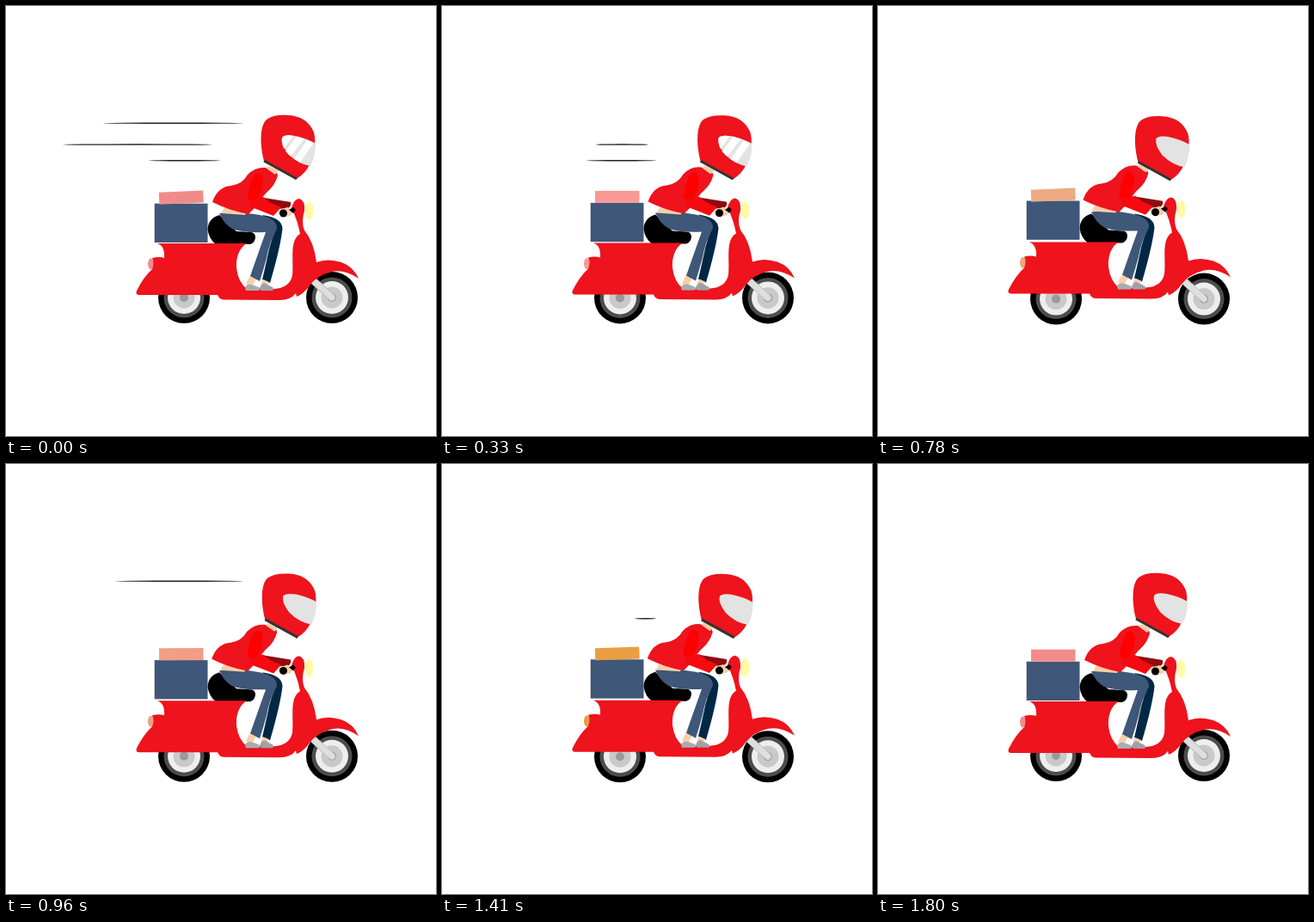
An HTML page for the animation above (1.86 s loop, 500 by 500 pixels).

```html
<!DOCTYPE html>
<html lang="en">
<head>
<meta charset="utf-8">
<title>Scooter delivery</title>
<style>
html, body { margin: 0; width: 100%; height: 100%; overflow: hidden; background: #fff; }
svg { display: block; width: 100%; height: 100%; }
</style>
</head>
<body>
<svg viewBox="0 0 500 500">
  <g id="lines" fill="#222"><ellipse/><ellipse/><ellipse/></g>

  <g id="wheels">
    <g id="wheel">
      <circle cx="207" cy="339" r="30"/>
      <circle cx="207" cy="339" r="23.500" fill="#4d4d4d"/>
      <circle cx="207" cy="339" r="19" fill="#eee"/>
      <circle cx="207" cy="339" r="12.500" fill="#c9c9c9"/>
      <circle cx="207" cy="339" r="5" fill="#999"/>
    </g>
    <use href="#wheel" x="172"/>
    <path d="M357 319L379 339" stroke="#bbb" stroke-width="8.500" stroke-linecap="round"/>
    <path d="M357 319L379 339" stroke="#dedede" stroke-width="7" stroke-linecap="round"/>
  </g>

  <g id="body">
    <path d="M248 243Q235 247 234.500 260Q236 271 244 277H284Q290 275 290 268Q289 263 284 263L268 262Q258 252 248 243Z"/>
    <ellipse id="tail" cx="168.500" cy="300" rx="3.500" ry="6.500"/>
    <path fill="#ee131c" d="M176 276H280C271 281 267 293 268 305Q270 321 280 329H311Q330 328 333 313C335 297 329 272 342 265Q339 249 332 235Q335 224 341 224Q348 226 347 238Q343 251 347 261Q358 274 361 298Q374 293 390 298Q404 303 410 317Q394 306 379 309Q362 313 353 325Q347 334 338 338L337 334Q331 342 318 342L253 341.500Q248 341 246 336H155Q150 336 152 331Q160 315 170 306Q173 299 170 293Q178 291 184 293Q185 279 176 276Z"/>
    <ellipse cx="352.500" cy="238" rx="5" ry="10.500" fill="#fffaa5"/>

    <path fill="#002845" d="M298 243Q321 246 321.500 259Q319 281 307 322L298 318Q303 297 306 282Q309 270 314 259Z"/>
    <path fill="#f7cfa8" d="M284 313L291 317L286 326L279 323ZM299 318L306 321L303 327L296 324Z"/>
    <path fill="#3f5778" d="M248 241Q270 238 295 243Q316 247 315 259Q306 275 303 293Q299 308 295 320L284 314Q292 291 302 263Q275 264 263 259Q253 253 248 241Z"/>
    <path fill="#9fa1a6" d="M295 329Q295 325 300 322L310 327Q313 330 309 331H297Z"/>
    <path fill="#aaacb0" d="M278 328Q279 323 286 324L294 327Q297 331 292 331H279Z"/>
  </g>

  <rect id="box" x="172.700" y="229.700" width="61.800" height="45.300" fill="#3f5778"/>
  <rect id="lid" x="178" y="215.700" width="51.500" height="14"/>

  <g id="torso">
    <path fill="#f7cfa8" d="M254 234L280 239L278 243L250 241Z"/>
    <path fill="#ee131c" d="M240 228Q246 210 262 209Q275 207 281 196Q290 187 301 188Q315 190 316 197Q313 208 305 215Q298 221 294 230Q288 236 282 242Q260 238 240 228Z"/>
    <path fill="#f7cfa8" d="M306 186L317 191L313 196L303 189Z"/>
  </g>
  <g id="arm">
    <path fill="#8f0b10" d="M300 223L331 228Q332 233 328 235L316 236L299 229Z"/>
    <path fill="#f50a10" d="M283 226L299 222L308 229L320 234L311 244Q296 238 283 233Z"/>
    <path fill="#f7cfa8" d="M316 238L327 234Q335 238 332 243Q325 247 318 243Z"/>
    <circle cx="322.500" cy="241" r="4.500"/>
    <path d="M329 237L334 234L337 237L334 241Z"/>
  </g>
  <path id="sleeve" fill="#f00" d="M290 195Q299 192 299 205Q297 217 293 224Q286 229 281 223Q283 204 290 195Z"/>

  <g id="head">
    <path fill="#ee131c" d="M300 180C295 161 295 139 303 132Q311 126 328 127Q350 128 358 147Q362 162 353 184Q349 194 338 201Z"/>
    <path d="M300 180L338 201" stroke="#333" stroke-width="3"/>
    <path fill="#e3e3e3" d="M321 153Q324 149 336 151Q350 154 360 160Q360 174 354 186Q340 184 328 172Q319 160 321 153Z"/>
    <path id="glare" fill="#fff" d="M321 153Q324 149 334 151L323 166Q320 158 321 153ZM338 151.500L347 154.500L331 175L325 169ZM350 156L358 159L342 182L335 178Z"/>
  </g>
</svg>
<script>
const $ = id => document.getElementById(id);

// time, lid angle, lid and tail light colour
const keys = [
  [0, -2.5, [241, 139, 137]],
  [330, 0, [249, 153, 150]],
  [570, 0, [240, 177, 173]],
  [780, -2.5, [237, 169, 130]],
  [1110, 1.5, [247, 147, 138]],
  [1410, -2, [233, 158, 66]],
  [1800, 0, [242, 139, 137]]
];

// left, right, height, first erase, duration
const streaks = [
  [113, 276, 136.2, 0, 330],
  [66, 240, 161.1, 150, 300],
  [166, 249, 179.8, 300, 330]
];
const CYCLE = 900, GROW = 90;

const clamp = x => Math.max(0, Math.min(1, x));
const ease = x => (x = clamp(x), x * x * (3 - 2 * x));
const mix = (a, b, p) => a + (b - a) * p;

function shift(id, x, y, extra = "") {
  $(id).setAttribute("transform", `translate(${x} ${y}) ${extra}`);
}

function drawStreak(el, [left, right, y, first, length], t) {
  const second = t >= first + CYCLE - GROW;
  const start = first + (second ? CYCLE : 0);
  const from = mix(left, right, ease((t - start) / length));
  const to = second ? mix(left, right, clamp((t - start + GROW) / GROW)) : right;
  const set = (name, value) => el.setAttribute(name, value);
  set("cx", (from + to) / 2);
  set("cy", y);
  set("rx", Math.max(0, (to - from) / 2));
  set("ry", 0.75);
}

function draw(now) {
  const t = Math.min(1800, Math.floor(now % 1860 / 30) * 30);
  const bob = 1 - Math.abs(1 - t % 300 / 150);

  shift("wheels", 0, 2 * bob);
  shift("body", 0, -2 * bob);
  shift("arm", 0, -1.5 * bob);
  shift("box", 0, -4 * bob);
  shift("torso", -2 * bob, -3 * bob);
  shift("sleeve", -bob, -2 * bob);
  shift("head", 3 * bob, 1.5 * bob);

  const i = Math.max(1, keys.findIndex(k => k[0] >= t));
  const [t0, a0, c0] = keys[i - 1], [t1, a1, c1] = keys[i];
  const p = (t - t0) / (t1 - t0);
  const color = `rgb(${c0.map((c, n) => Math.round(mix(c, c1[n], p)))})`;
  shift("lid", 0, -4 * bob, `rotate(${mix(a0, a1, p)} 204 223)`);
  $("lid").setAttribute("fill", color);
  $("tail").setAttribute("fill", color);
  $("glare").setAttribute("visibility", t < 450 ? "visible" : "hidden");

  streaks.forEach((s, n) => drawStreak($("lines").children[n], s, t));
}

const begin = performance.now();
function loop() {
  draw(performance.now() - begin);
  requestAnimationFrame(loop);
}
loop();
</script>
</body>
</html>
```
